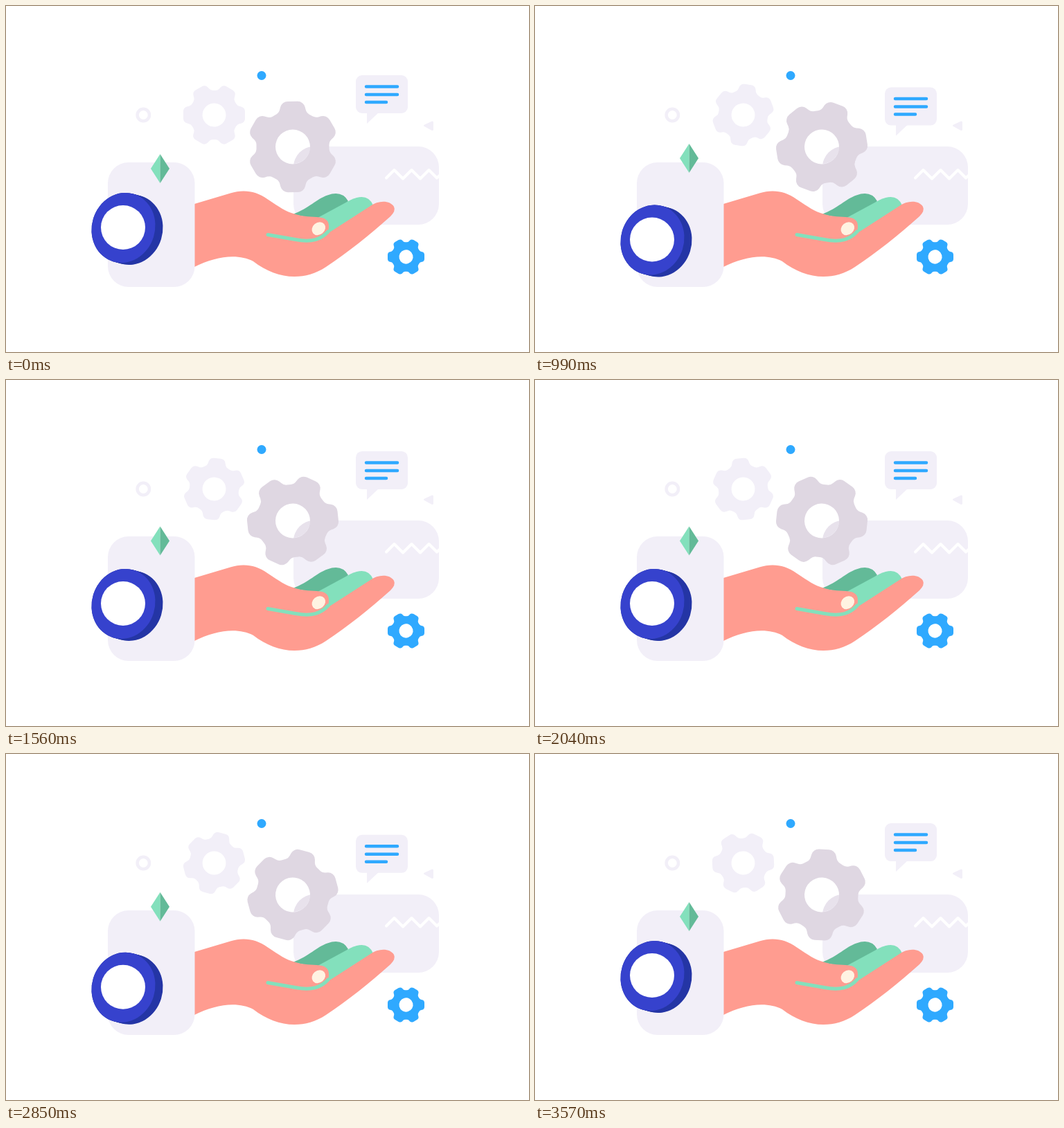
An HTML page with a canvas for the animation above (3.6 s loop, 755 by 500 pixels).

```html
<!DOCTYPE html>
<html lang="en">
<head>
<meta charset="utf-8">
<title>Open hand with gears</title>
<style>
  html, body { margin: 0; width: 100%; height: 100%; overflow: hidden; background: #fff; }
  canvas { display: block; }
</style>
</head>
<body>
<canvas id="stage" width="755" height="500"></canvas>
<script>
const ctx = document.getElementById('stage').getContext('2d');
const LOOP = 3600;
const PALE = '#f2eff8', MAUVE = '#dfd7e2', SKIN = '#ff9c90', BLUE = '#2fa9ff';
const MINT = '#83e0bc', GREEN = '#63ba98', COIN = '#3642cd', COIN_EDGE = '#2435a5';
const TAU = Math.PI * 2;

function fill(d, color) {
  ctx.fillStyle = color;
  ctx.fill(new Path2D(d));
}

function line(d, color, width) {
  ctx.strokeStyle = color;
  ctx.lineWidth = width;
  ctx.stroke(new Path2D(d));
}

function oval(x, y, rx, ry, tilt, color) {
  ctx.fillStyle = color;
  ctx.beginPath();
  ctx.ellipse(x, y, rx, ry, tilt, 0, TAU);
  ctx.fill();
}

function box(x, y, w, h, r, color) {
  ctx.fillStyle = color;
  ctx.beginPath();
  ctx.roundRect(x, y, w, h, r);
  ctx.fill();
}

function shifted(dy, draw) {
  ctx.save();
  ctx.translate(0, dy);
  draw();
  ctx.restore();
}

// Six rounded teeth, the first one pointing up, around a round hole.
function makeGear() {
  const path = new Path2D(), points = [];
  for (let tooth = 0; tooth < 6; tooth++) {
    for (const [offset, r] of [[-22, 53], [-13.5, 67.5], [13.5, 67.5], [22, 53]]) {
      const a = (tooth * 60 + offset) * Math.PI / 180;
      points.push([r * Math.sin(a), -r * Math.cos(a)]);
    }
  }
  const [first, last] = [points[0], points[23]];
  path.moveTo((first[0] + last[0]) / 2, (first[1] + last[1]) / 2);
  points.forEach((p, i) => path.arcTo(...p, ...points[(i + 1) % 24], 11));
  path.closePath();
  path.moveTo(25, 0);
  path.arc(0, 0, 25, 0, TAU);
  return path;
}
const gearPath = makeGear();

function gear(x, y, scale, degrees, color) {
  ctx.save();
  ctx.translate(x, y);
  ctx.scale(scale, scale);
  ctx.rotate(degrees * Math.PI / 180);
  ctx.fillStyle = color;
  ctx.fill(gearPath, 'evenodd');
  ctx.restore();
}

function card() {
  box(415, 203, 210, 113, 30, PALE);
  ctx.save();
  ctx.clip(new Path2D('M389 203a25 25 0 1 0 50 0a25 25 0 1 0-50 0Z'));
  box(415, 203, 210, 113, 30, '#e8e2ec');
  ctx.restore();
  line('M549 248.5L560.5 237L573 249.5L585.5 237L598 249.5L610.5 237L622 248.5L628 243', '#fff', 4);
}

function hand() {
  fill('M414 301C438 292 448 279 464 273.5Q485 266 494 282L466 306L440 306Z', GREEN);
  fill('M450 306L498 280Q522 269 530 288L467 331Z', MINT);
  fill(`M272 286L324 270.5C343 265 360 267 378 279.5C394 290 403 297 418 301
        C430 305 441 304 453 305.5Q466 307 466 318Q466 325 464 329
        L526 289C538 280 555 281 560 290Q563 296 555 304
        C525 331 492 357 462 377C427 400 388 393 357 369C334 357 302 362 272 377Z`, SKIN);
  line('M378 330.5L418 337.5C442 342 455 337 465 326', MINT, 5);
  oval(451.3, 321.7, 10.5, 8.7, -0.7, '#fff3e2');
}

function bubble() {
  box(505, 100, 75, 55, 9, PALE);
  fill('M521 153V170L538 154Z', PALE);
  line('M520 116.5H565M520 128H565M520 139H549', BLUE, 4.5);
}

// A tilted coin: its rim is the face swept a little to the right and down.
function coin() {
  for (let step = 0; step <= 1; step += 0.25) {
    oval(169.5 + 11 * step, 320.5 + 3 * step, 45.5, 51, 0.3, COIN_EDGE);
  }
  oval(169.5, 320.5, 45.5, 51, 0.3, COIN);
  oval(169, 320, 32, 32, 0, '#fff');
}

function gem() {
  fill('M222.5 214L209 235L222.5 256Z', MINT);
  fill('M222.5 214L236 235L222.5 256Z', GREEN);
}

function frame(now) {
  const t = now % LOOP;
  const turn = t / LOOP * 360;
  const lift = (1 - Math.cos(t / LOOP * 2 * TAU)) / 2;

  ctx.clearRect(0, 0, 755, 500);
  ctx.lineCap = ctx.lineJoin = 'round';

  card();
  gear(300.5, 157.5, 0.678, 30 + turn, PALE);
  gear(414, 203.5, 1, -turn, MAUVE);
  gear(577.5, 362.5, 0.404, 30, BLUE);
  oval(369, 100.5, 6.5, 6.5, 0, BLUE);
  line('M207 157.5a8.7 8.7 0 1 1-17.4 0a8.7 8.7 0 1 1 17.4 0Z', PALE, 4.5);
  fill('M604 171.5L615 166.5Q617 166 617 168V178Q617 181 614 179.5L604 174Q602 173 604 171.5Z', PALE);
  hand();
  box(147, 226, 125.5, 180, 30, PALE);
  shifted(18 * lift, bubble);
  shifted(18 * lift, coin);
  shifted(-15.3 * lift, gem);
}

const start = performance.now();
function tick(now) {
  frame(Math.max(0, now - start));
  requestAnimationFrame(tick);
}
tick(start);
</script>
</body>
</html>
```
